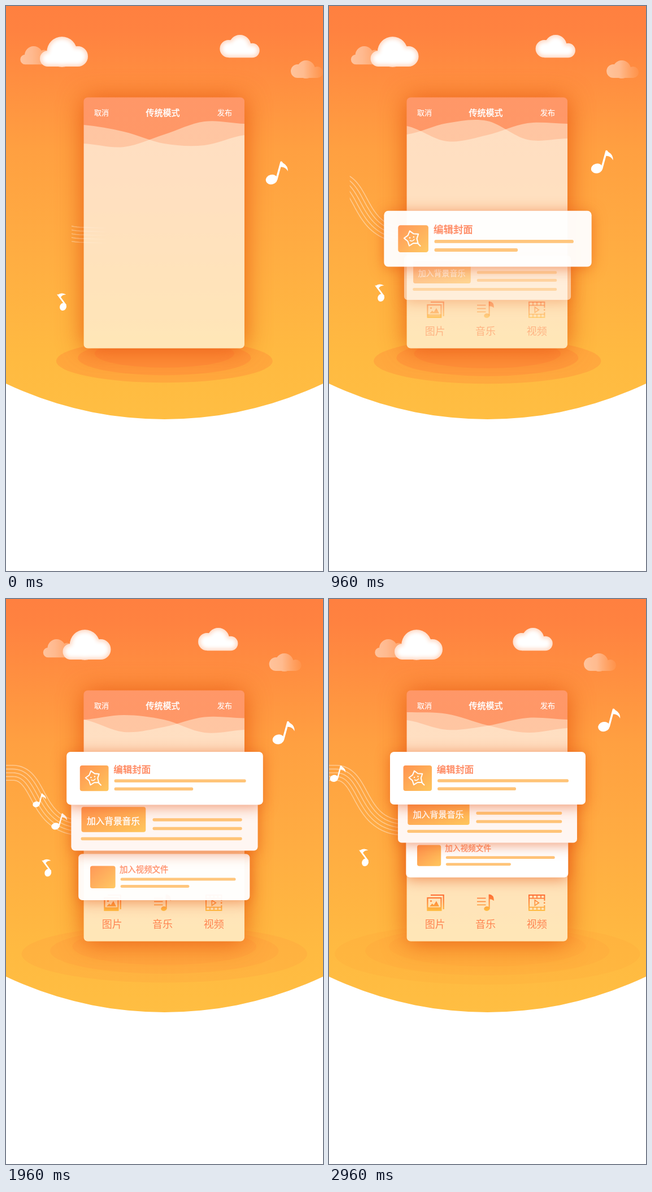
Recreate the animation shown at these times as an HTML page with a canvas. Size 561 by 998 pixels, loop 3 s.

```html
<!DOCTYPE html>
<html lang="zh">
<head>
<meta charset="utf-8">
<style>
html, body { margin: 0; width: 100%; height: 100%; overflow: hidden; background: #fff; }
canvas { display: block; }
</style>
</head>
<body>
<canvas id="stage" width="561" height="998"></canvas>
<script>
const c = document.getElementById('stage').getContext('2d');
const W = 561, H = 998, LOOP = 3000, STEP = 40;
const FONT = '"Noto Sans CJK SC", "Noto Sans CJK", "Noto Sans CJK JP", sans-serif';

const mix = (a, b, u) => a + (b - a) * u;
const ramp = (t, start, len) => Math.min(1, Math.max(0, (t - start) / len));
const ease = (t, start, len) => {
  const u = ramp(t, start, len);
  return u * u * (3 - 2 * u);
};

function grad(x0, y0, x1, y1, ...stops) {
  const g = c.createLinearGradient(x0, y0, x1, y1);
  stops.forEach(([p, col]) => g.addColorStop(p, col));
  return g;
}

function box(x, y, w, h, r, fill) {
  c.beginPath();
  c.roundRect(x, y, w, h, r);
  c.fillStyle = fill;
  c.fill();
}

function dot(x, y, rx, ry = rx, turn = 0) {
  c.beginPath();
  c.ellipse(x, y, rx, ry, turn, 0, Math.PI * 2);
  c.fill();
}

function line(w, ...pts) {
  c.lineWidth = w;
  c.beginPath();
  pts.forEach(([x, y]) => c.lineTo(x, y));
  c.stroke();
}

// bold is the extra stroke width in pixels
function text(str, x, mid, size, fill, bold = 0, weight = 400) {
  c.font = `${weight} ${size}px ${FONT}`;
  c.fillStyle = c.strokeStyle = fill;
  const y = mid + size * 0.38;
  c.fillText(str, x, y);
  if (bold) {
    c.lineWidth = bold;
    c.strokeText(str, x, y);
  }
}

// Shadow outside a rounded box only
function glow(x, y, w, h, r, color, blur, dy) {
  c.save();
  c.beginPath();
  c.rect(0, 0, W, H);
  c.roundRect(x, y, w, h, r);
  c.clip('evenodd');
  c.shadowColor = color;
  c.shadowBlur = blur;
  c.shadowOffsetY = dy;
  box(x, y, w, h, r, '#f07030');
  c.restore();
}

function sky() {
  c.fillStyle = '#fff';
  c.fillRect(0, 0, W, H);
  c.save();
  c.beginPath();
  c.rect(0, 0, W, 600);
  c.arc(280.5, 74, 656, 0, 7);
  c.clip();
  c.fillStyle = grad(0, 0, 0, 730, [0, '#ff8040'], [0.06, '#ff8240'], [0.35, '#ffa041'],
    [0.6, '#ffad42'], [0.85, '#ffba41'], [1, '#ffbe42']);
  c.fillRect(0, 0, W, 731);
  c.restore();
}

function ripples(t) {
  const p = ease(t, 500, 2100), r = mix(191.5, 270, p);
  c.fillStyle = `rgba(255,115,52,${mix(0.27, 0.07, p)})`;
  [[1, 627], [0.8, 621.5], [0.645, 614]].forEach(([k, y]) => dot(280.3, y, r * k, r * k * 0.2));
}

// Three lobes (left, middle, right) standing on a flat base
function lobes(parts, base, inset) {
  c.beginPath();
  parts.forEach(([x, y, r]) => {
    c.moveTo(x + r - inset, y);
    c.arc(x, y, r - inset, 0, Math.PI * 2);
  });
  const [l, , r] = parts, top = Math.min(l[1], r[1]);
  c.rect(l[0], top, r[0] - l[0], base - inset - top);
}

function cloud(parts, base, dx) {
  c.save();
  c.translate(dx, 0);
  lobes(parts, base, 0);
  c.fillStyle = '#ffd9c4';
  c.fill();
  c.clip();
  lobes(parts, base, 3.5);
  c.filter = 'blur(3.5px)';
  c.fillStyle = '#fff';
  c.fill();
  c.restore();
}

function haze(parts, base, dx, end) {
  const [l, , r] = parts;
  c.save();
  c.translate(dx, 0);
  lobes(parts, base, 0);
  c.fillStyle = grad(l[0] - l[2], 0, r[0] + r[2], 0,
    [0, 'rgba(255,222,200,.68)'], [0.4, 'rgba(255,218,195,.6)'], [1, `rgba(255,200,160,${end})`]);
  c.fill();
  c.restore();
}

function clouds(e) {
  haze([[34, 94.5, 8.7], [49, 87, 16], [67.5, 87, 9.5]], 103.3, 56 * e, 0.4);
  cloud([[74, 93, 14], [99, 81, 26.7], [127, 89, 18]], 107, 56 * e);
  cloud([[394, 75.5, 15.6], [414, 70.5, 19.5], [436, 78.5, 12.7]], 91.2, -53 * e);
  haze([[516, 115, 12], [531, 112, 16], [551, 117, 10]], 127, -53 * e, 0.1);
}

function note(x, y, s = 1, alpha = 1) {
  c.save();
  c.globalAlpha = alpha;
  c.translate(x, y);
  c.scale(s, s);
  c.fillStyle = '#fff';
  dot(0, 0.5, 10.4, 8.5, -0.25);
  c.fill(new Path2D('M7 0L15.5 -31Q18 -33 20 -29Q29.5 -23.5 28.7 -14Q25 -21.5 16.5 -21.7L10.3 1Z'));
  c.restore();
}

function smallNote(x, y) {
  c.save();
  c.translate(x, y);
  c.fillStyle = '#fff';
  dot(0, -0.8, 5.8, 6.9, 0.35);
  c.fill(new Path2D('M-11 -22.5Q-8 -22 -6 -23.7Q0 -26 5.5 -22Q-1 -22.5 -4 -17.7L6 -4L3.5 -3Z'));
  c.restore();
}

// Each wave bends from a first shape to a second and on to a third
function wave(t, first, second, third) {
  const p = ease(t, 0, 640), q = ease(t, 1400, 1100), dx = 71.2;
  const y = first.map((v, i) => mix(mix(v, second[i], p), third[i], q));
  const m = i => (y[Math.min(4, i + 1)] - y[Math.max(0, i - 1)]) / 6;
  c.beginPath();
  c.moveTo(137.5, 605);
  c.lineTo(137.5, y[0]);
  for (let i = 0; i < 4; i++) {
    const x = 137.5 + dx * i;
    c.bezierCurveTo(x + dx / 3, y[i] + m(i), x + dx * 2 / 3, y[i + 1] - m(i + 1), x + dx, y[i + 1]);
  }
  c.lineTo(422.3, 605);
  c.fillStyle = 'rgba(255,250,230,.46)';
  c.fill();
}

function panel(t) {
  glow(137.5, 161.5, 284.5, 443, 7, 'rgba(228,82,14,.85)', 44, 2);
  c.save();
  c.beginPath();
  c.roundRect(137.5, 161.5, 284.5, 443, 7);
  c.clip();
  c.fillStyle = grad(0, 162, 0, 604, [0, '#ff9768'], [0.25, '#ff9866'], [1, '#ffb241']);
  c.fillRect(137, 161, 286, 444);
  wave(t, [210, 222, 243, 246, 228], [227, 207, 203, 236, 234], [200, 203, 223, 236, 228]);
  wave(t, [243, 249, 227, 204, 208], [212, 239, 228, 207, 208], [214, 231, 224, 210, 213]);
  c.restore();
  text('取消', 156, 188, 13, '#fff', 0.2);
  text('传统模式', 247.5, 188, 15, '#fff', 0.5);
  text('发布', 374, 188, 13, '#fff', 0.2);
}

function pictures() {
  line(2.2, [180, 523], [202.7, 523], [202.7, 548]);
  c.strokeRect(174.4, 528, 24, 22);
  c.fillRect(174, 544.5, 25, 6.5);
  dot(180.5, 533.5, 1.6);
  c.fill(new Path2D('M178 543L182.5 538L185.5 540.5L190 533.5L195 543Z'));
}

function music() {
  [528.5, 534.5, 540.3].forEach(y => line(1.6, [262, y], [277.5, y]));
  line(2, [283.6, 522], [283.6, 547]);
  dot(279.4, 547, 5.2, 4, -0.15);
  c.fill(new Path2D('M283 521.5Q292 522 292 533Q288 530 283 530Z'));
}

function video() {
  line(2, [381.4, 533], [381.4, 523], [354, 523], [354, 550], [381.4, 550], [381.4, 541]);
  c.fillRect(380, 535.5, 2.4, 2.6);
  [523, 544.5].forEach((y, i) => {
    const edge = i ? y : y + 5.7;
    line(1.7, [354, edge], [381.4, edge]);
    [361, 368, 375].forEach(x => line(1.7, [x, y], [x, y + 5.7]));
  });
  c.lineWidth = 1.6;
  c.stroke(new Path2D('M364.3 532L371.3 536.7L364.3 541.4Z'));
}

function menu(t) {
  c.save();
  c.globalAlpha = ease(t, 300, 1300);
  c.strokeStyle = c.fillStyle = grad(0, 521, 0, 552, [0, '#ff6b35'], [0.45, '#ff8a3c'], [1, '#ffc244']);
  pictures();
  music();
  video();
  [['图片', 169.7], ['音乐', 259], ['视频', 349.8]]
    .forEach(([s, x]) => text(s, x, 574.3, 18, '#ff8350', 0, 300));
  c.restore();
}

// Stave centre line: points with unit normals and distance along the curve
const STAVE = [[-80, 307, 0, -1, -92]];
for (let i = 0, far = 0; i <= 41; i++) {
  const u = i / 40, v = 1 - u;
  const bez = (a, b, d, e) => a * v * v * v + 3 * b * v * v * u + 3 * d * v * u * u + e * u * u * u;
  const vel = (a, b, d, e) => (b - a) * v * v + 2 * (d - b) * v * u + (e - d) * u * u;
  const X = [12, 62, 50, 130], Y = [307, 307, 400, 404];
  const dx = vel(...X), dy = vel(...Y), l = Math.hypot(dx, dy);
  const x = i > 40 ? 190 : bez(...X), y = i > 40 ? 406 : bez(...Y);
  const [px, py] = STAVE[i];
  if (i) far += Math.hypot(x - px, y - py);
  STAVE.push([x, y, dy / l, -dx / l, far]);
}

function along(s, off) {
  const i = Math.max(1, STAVE.findIndex(p => p[4] >= s));
  const a = STAVE[i - 1], b = STAVE[i], u = (s - a[4]) / (b[4] - a[4]);
  const [x, y, nx, ny] = a.map((v, k) => mix(v, b[k], u));
  return [x + nx * off, y + ny * off];
}

// A note fades in at the right and gathers speed along the stave
function rider(t, size) {
  const u = t - 640, s = 189 - 0.051 * u - 2.68e-5 * u * u, alpha = ramp(t, 400, 950);
  if (alpha > 0 && s > -90) note(...along(s, -9.5), size, alpha);
}

function stave(t) {
  const left = 116 - 120 * (1 - (1 - ramp(t, 0, 2300)) ** 2);
  c.save();
  c.beginPath();
  c.rect(left, 270, 300, 180);
  c.clip();
  c.strokeStyle = grad(105, 0, 180, 0, [0, 'rgba(255,255,255,.4)'], [1, 'rgba(255,255,255,0)']);
  for (let k = -2; k <= 2; k++) {
    line(1.6, ...STAVE.map(([x, y, nx, ny]) => [x + nx * k * 6.6, y + ny * k * 6.6]));
  }
  c.restore();
  rider(t, 0.6);
  rider(t - 430, 0.71);
}

// Gradient whose bands run parallel to the rising diagonal
function tile(x, y, w, h) {
  const k = w * h / (w * w + h * h), cx = x + w / 2, cy = y + h / 2;
  box(x, y, w, h, 4, grad(cx - h * k, cy - w * k, cx + h * k, cy + w * k, [0, '#ff9350'], [1, '#ffc65c']));
}

function bar(x, y, w, h = 5.6) {
  box(x, y - h / 2, w, h, 2.5, '#ffc478');
}

function star() {
  c.strokeStyle = c.fillStyle = '#fff';
  c.lineWidth = 2;
  c.lineJoin = c.lineCap = 'round';
  c.beginPath();
  for (let i = 0; i < 10; i++) {
    const a = -1.85 + i * Math.PI / 5, r = i % 2 ? 8.3 : 13;
    c.lineTo(-126.5 + r * Math.cos(a), -0.5 + r * Math.sin(a));
  }
  c.closePath();
  c.stroke();
  line(2, [-117.5, 7], [-112.5, 12]);
  dot(-130, -1.5, 1.2);
  dot(-123.5, -3, 1.2);
  c.lineWidth = 1.5;
  c.stroke(new Path2D('M-129.5 3Q-125.5 5.5 -122.5 1'));
}

function coverCard() {
  tile(-149.5, -22.5, 50.5, 45);
  star();
  text('编辑封面', -90.3, -15.5, 16.4, '#ff8258', 0.4);
  bar(-89, 4.5, 232);
  bar(-89, 18.7, 139);
}

function musicCard() {
  tile(-150.5, -34, 116.5, 45.5);
  text('加入背景音乐', -140.7, -9, 16, '#fff', 0.4);
  bar(-21.5, -10.7, 162);
  bar(-21.5, 5.2, 162);
  bar(-151.5, 23.5, 292);
}

function videoCard() {
  tile(-130.5, -19.7, 44.5, 39.5);
  text('加入视频文件', -78.7, -13.7, 14.4, '#ff8a62', 0.3);
  bar(-77, 3.8, 203.5, 5);
  bar(-77, 16.3, 121.5, 5);
}

// Back to front; y runs from low to high, size from small over peak to rest
const CARDS = [
  { start: 1000, x: 279.8, y: [525, 453], w: 302.5, h: 81.5, size: [0.73, 1.015, 0.944], fill: '#fff', draw: videoCard },
  { start: 360, x: 280.5, y: [505.3, 388.3], w: 338, h: 90, size: [0.7, 1.005, 0.938], fill: '#fff6f2', draw: musicCard },
  { start: 0, x: 281, y: [495, 316.5], w: 346, h: 93, size: [0.82, 1.073, 1], fill: '#fff', draw: coverCard }
];

function card({ start, x, y, w, h, size, fill, draw }, t) {
  const grow = ease(t, start, 1100);
  if (!grow) return;
  const s = mix(mix(size[0], size[1], grow), size[2], ease(t, start + 1200, 900));
  const top = mix(y[0], y[1], ease(t, start, 2000));
  c.save();
  c.globalAlpha = grow;
  glow(x - w * s / 2, top - h * s / 2, w * s, h * s, 7 * s, 'rgba(230,85,20,.6)', 24, 3);
  c.translate(x, top);
  c.scale(s, s);
  box(-w / 2, -h / 2, w, h, 7, fill);
  draw();
  c.restore();
}

function frame() {
  const t = Math.floor(performance.now() % LOOP / STEP) * STEP;
  const e = ease(t, 0, LOOP);
  sky();
  clouds(e);
  ripples(t);
  panel(t);
  menu(t);
  stave(t);
  CARDS.forEach(k => card(k, t));
  note(470 + 16.5 * e, 306 - 81 * e);
  smallNote(101 - 37 * e, 532 - 66 * e);
  requestAnimationFrame(frame);
}
frame();
</script>
</body>
</html>
```
